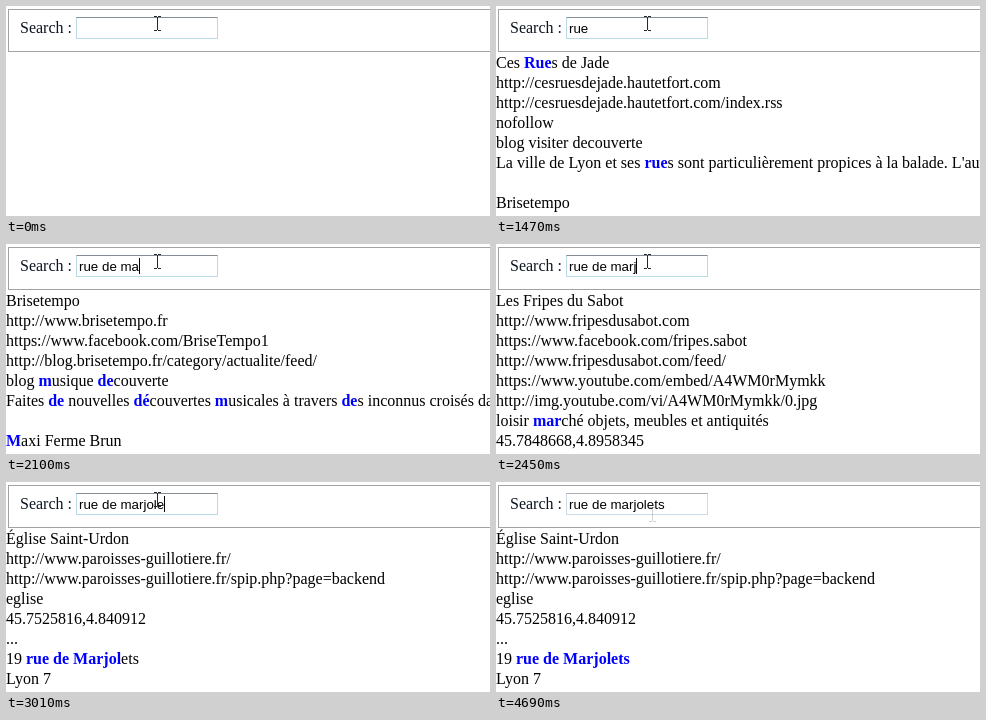
These frames come from a looping animation (484 by 210 pixels, 4.83 s). An HTML page:

```html
<!DOCTYPE html>
<html lang="fr">
<head>
<meta charset="utf-8">
<title>Search</title>
<style>
  html, body { margin: 0; width: 100%; height: 100%; overflow: hidden; background: #fff; }
  body { position: relative; font: 16px/20px "Liberation Serif", serif; color: #000; }
  body > * { position: absolute; box-sizing: border-box; white-space: pre; }
  #frame { left: 2px; top: 3px; width: 500px; height: 43px; border: 1px solid #a2a2a2; }
  #label { left: 14px; top: 12px; color: #0c1420; }
  #field { left: 70px; top: 11px; width: 142px; height: 22px; border: 1px solid #b9dbe7; border-top-color: #858c94; }
  #field.idle { border-color: #abadb3 #c9dbe6 #c9dbe6; }
  #query { left: 73px; top: 14px; height: 16px; font: 13.333px/18px "Liberation Sans", sans-serif; border-right: 1px solid transparent; }
  #query.caret { border-color: #000; }
  #results { left: 0; top: 47px; }
  #results b { color: #00f; }
  #mouse { left: 0; top: 0; fill: none; stroke: #26262e; }
</style>
</head>
<body>
<div id="frame"></div>
<div id="label">Search :</div>
<div id="field"></div>
<div id="query"></div>
<div id="results"></div>
<svg id="mouse" width="7" height="15"><path d="M0 .5h3m1 0h3M3.5 1v13M0 14.5h3m1 0h3"/></svg>
<script>
const LOOP = 4830, TICK = 70, FOCUS = 350, BLINK = 490, SEARCH_DELAY = 140, LEAVE = 3640;
const $ = id => document.getElementById(id);

// Results that appear once the query begins with the given letters.
const RESULTS = {
  'ru': `Ces Rues de Jade
http://cesruesdejade.hautetfort.com
http://cesruesdejade.hautetfort.com/index.rss
nofollow
blog visiter decouverte
La ville de Lyon et ses rues sont particulièrement propices à la balade. L'automne

Brisetempo`,
  'rue de m': `Brisetempo
http://www.brisetempo.fr
https://www.facebook.com/BriseTempo1
http://blog.brisetempo.fr/category/actualite/feed/
blog musique decouverte
Faites de nouvelles découvertes musicales à travers des inconnus croisés dans la rue

Maxi Ferme Brun`,
  'rue de ma': `Les Fripes du Sabot
http://www.fripesdusabot.com
https://www.facebook.com/fripes.sabot
http://www.fripesdusabot.com/feed/
https://www.youtube.com/embed/A4WM0rMymkk
http://img.youtube.com/vi/A4WM0rMymkk/0.jpg
loisir marché objets, meubles et antiquités
45.7848668,4.8958345`,
  'rue de marj': `Église Saint-Urdon
http://www.paroisses-guillotiere.fr/
http://www.paroisses-guillotiere.fr/spip.php?page=backend
eglise
45.7525816,4.840912
...
19 rue de Marjolets
Lyon 7`
};

// Bursts of typing: start and pause between keys, in ms.
const BURSTS = [
  { text: 'r', start: 420, pause: 70 },
  { text: 'ue ', start: 700, pause: 70 },
  { text: 'de ', start: 1540, pause: 105 },
  { text: 'ma', start: 1960, pause: 140 },
  { text: 'rjol', start: 2310, pause: 140 },
  { text: 'ets', start: 3010, pause: 105 }
];
const keys = BURSTS.flatMap(({ text, start, pause }) =>
  [...text].map((letter, i) => ({ letter, time: start + i * pause })));

const pressed = t => keys.filter(key => key.time <= t);
const queryAt = t => pressed(t).map(key => key.letter).join('');

function caretOn(t) {
  const lastKey = pressed(t).pop()?.time ?? FOCUS;
  return t >= FOCUS && Math.floor((t - lastKey) / BLINK) % 2 === 0;
}

// Bold every word beginning with one of the search terms, except in links.
function search(query) {
  const match = Object.keys(RESULTS).filter(key => query.startsWith(key)).pop();
  if (!match) return '';
  const terms = query.trim().replace(/e/g, '[eé]').split(' ').join('|');
  const prefix = new RegExp(`(?<!\\p{L})(${terms})`, 'giu');
  return RESULTS[match].split('\n')
    .map(line => line.startsWith('http') ? line : line.replace(prefix, '<b>$1</b>'))
    .join('\n');
}

function draw() {
  const t = Math.floor(performance.now() % LOOP / TICK) * TICK;
  const away = Math.min(1, Math.max(0, (t - LEAVE) / (3 * TICK)));
  $('query').textContent = queryAt(t);
  $('query').classList.toggle('caret', caretOn(t));
  $('field').classList.toggle('idle', away === 1);
  $('results').innerHTML = search(queryAt(t - SEARCH_DELAY));
  $('mouse').style.transform = `translate(${Math.round(148 + 5 * away)}px, ${10 + 15 * away}px)`;
  $('mouse').style.opacity = 1 - 0.8 * away;
  requestAnimationFrame(draw);
}
draw();
</script>
</body>
</html>
```
